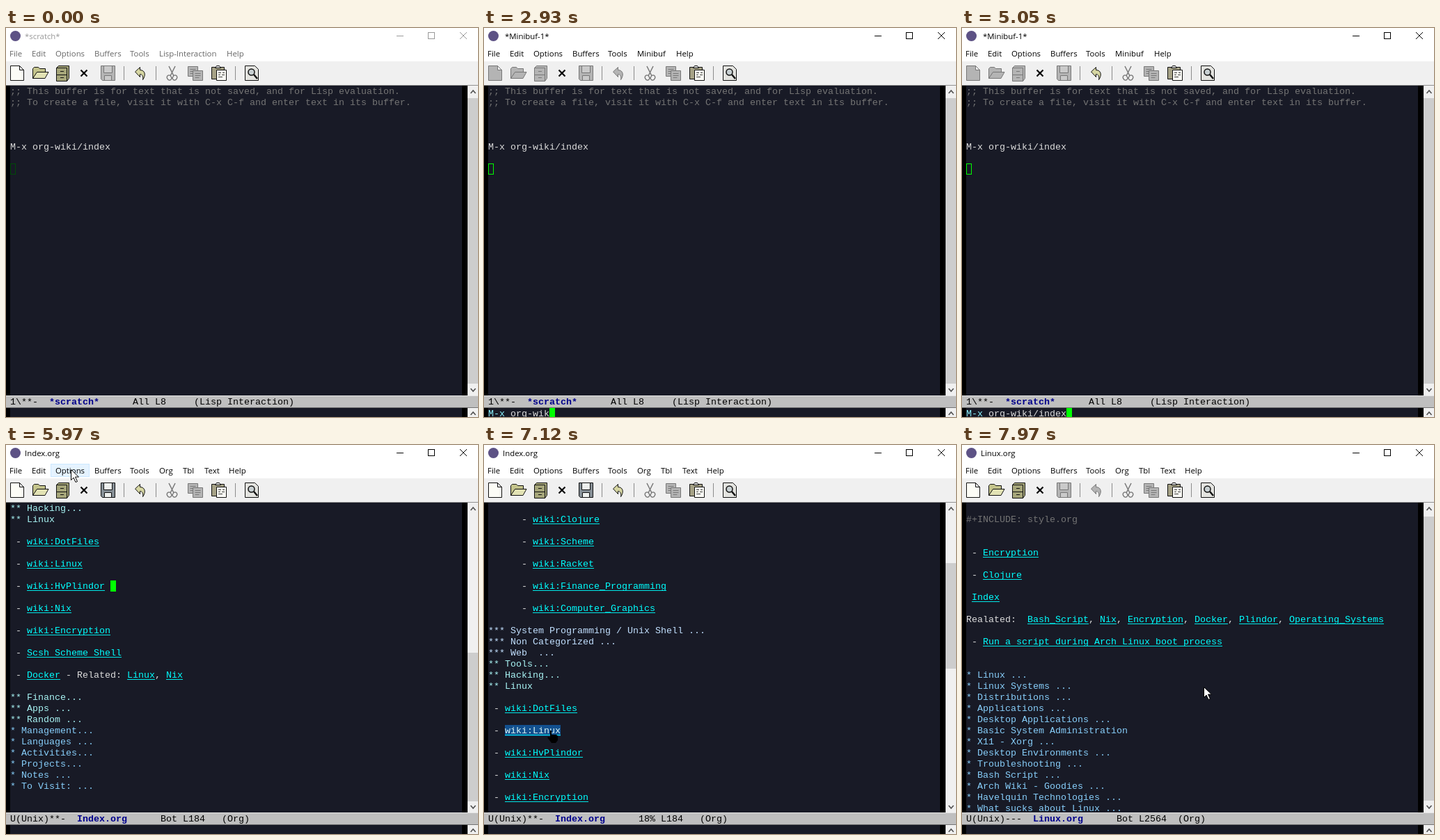
Animation of 678 by 560 pixels, one loop 8000 ms. Source, as an HTML page with a canvas:

```html
<!DOCTYPE html>
<html lang="en">
<head>
<meta charset="utf-8">
<title>Wiki index</title>
<style>
html, body { margin: 0; width: 100%; height: 100%; overflow: hidden; background: #fff; }
canvas { display: block; }
</style>
</head>
<body>
<canvas id="stage" width="678" height="560"></canvas>
<script>
const ctx = document.getElementById('stage').getContext('2d');
const LOOP = 8000, COL = 8, ROW = 16, LEFT = 6, TOP = 83, MODE_Y = 529, MODE_H = 18, ECHO_Y = 547;
const MONO = '13.333px "Liberation Mono", monospace';
const UI = '11.4px "Open Sans", sans-serif';
const BG = '#181a26', GREEN = '#00ff00';

// Links are written in [brackets].
const SCRATCH = [
  ';; This buffer is for text that is not saved, and for Lisp evaluation.',
  ';; To create a file, visit it with C-x C-f and enter text in its buffer.',
  '', '', '', 'M-x org-wiki/index'];

const COMPLETIONS = [
  'Click on a completion to select it.',
  'In this buffer, type RET to select the completion near point.',
  '', 'Possible completions are:', 'org-wiki/index', 'org-wiki/insert'];

const spaced = (indent, names) => names.flatMap(n => [indent + '- ' + n, '']);
const INDEX = [
  '',
  ...spaced('      ', ['[wiki:Clojure]', '[wiki:Scheme]', '[wiki:Racket]',
    '[wiki:Finance_Programming]', '[wiki:Computer_Graphics]']),
  '*** System Programming / Unix Shell ...', '*** Non Categorized ...', '*** Web  ...',
  '** Tools...', '** Hacking...', '** Linux', '',
  ...spaced(' ', ['[wiki:DotFiles]', '[wiki:Linux]', '[wiki:HvPlindor]', '[wiki:Nix]',
    '[wiki:Encryption]', '[Scsh Scheme Shell]', '[Docker] - Related: [Linux], [Nix]']),
  '** Finance...', '** Apps ...', '** Random ...',
  '* Management...', '* Languages ...', '* Activities...', '* Projects...', '* Notes ...',
  '* To Visit: ...'];

const LINUX = [
  '', '#+INCLUDE: style.org', '', '',
  ...spaced(' ', ['[Encryption]', '[Clojure]']), ' [Index]', '',
  'Realated:  [Bash_Script], [Nix], [Encryption], [Docker], [Plindor], [Operating_Systems]', '',
  ' - [Run a script during Arch Linux boot process]', '', '',
  '* Linux ...', '* Linux Systems ...', '* Distributions ...', '* Applications ...',
  '* Desktop Applications ...', '* Basic System Administration', '* X11 - Xorg ...',
  '* Desktop Environments ...', '* Troubleshooting ...', '* Bash Script ...',
  '* Arch Wiki - Goodies ...', '* Havelquin Technologies ...', '* What sucks about Linux ...'];

const COMMAND = 'org-wiki/index';
// [time, characters typed]
const TYPING = [[1290, 0], [1610, 2], [1910, 3], [2080, 4], [2630, 5], [2930, 7], [3010, 9],
  [4040, 10], [4190, 11], [4730, 12], [4880, 13], [5050, 14]];
// [time, x, y]
const POINTER = [[140, 150, 322], [450, 70, 216], [1610, 70, 216], [3560, 72, 214], [3800, 79, 195],
  [5810, 79, 195], [5970, 93, 35], [6040, 93, 35], [6350, 95, 300], [6660, 100, 376],
  [7120, 96, 411], [7300, 96, 411], [7970, 347, 348]];

const within = (t, a, b) => t >= a && t < b;

function rect(x, y, w, h, color) {
  ctx.fillStyle = color;
  ctx.fillRect(x, y, w, h);
}

function frame(x, y, w, h, color) {
  ctx.lineWidth = 1;
  ctx.strokeStyle = color;
  ctx.strokeRect(x + .5, y + .5, w - 1, h - 1);
}

function raised(y, h, face, light, dark) {
  rect(0, y, 678, h, face);
  rect(0, y, 678, 1, light);
  rect(0, y + h - 1, 678, 1, dark);
}

function shape(d, fill, stroke, width = 1) {
  const path = new Path2D(d);
  if (fill) { ctx.fillStyle = fill; ctx.fill(path); }
  if (stroke) { ctx.lineWidth = width; ctx.strokeStyle = stroke; ctx.stroke(path); }
}

function text(s, x, y, color, font = MONO) {
  ctx.font = font;
  ctx.fillStyle = color;
  ctx.fillText(s, x, y);
}

function pointerAt(t) {
  if (t < 140 || within(t, 1610, 3560) || within(t, 4040, 5810)) return null;
  const i = POINTER.findIndex(p => p[0] > t);
  if (i < 0) return POINTER.at(-1).slice(1);
  const [t0, x0, y0] = POINTER[i - 1], [t1, x1, y1] = POINTER[i];
  const k = (t - t0) / (t1 - t0);
  return [Math.round(x0 + (x1 - x0) * k), Math.round(y0 + (y1 - y0) * k)];
}

const hits = (p, x, y, w, h) => p && within(p[0], x, x + w) && within(p[1], y, y + h);

function lineColor(line) {
  if (/^(;;|#\+)/.test(line)) return '#747474';
  if (line.startsWith('***')) return '#c2e0ff';
  if (line.startsWith('**')) return '#a8f4f4';
  return line.startsWith('*') ? '#87cefa' : '#dcdcdc';
}

// Returns true when the pointer is over a link.
function drawLine(line, y, pointer) {
  let x = LEFT, hovered = false;
  line.split(/[\[\]]/).forEach((part, i) => {
    const w = part.length * COL, link = i % 2;
    const hot = link && hits(pointer, x, y, w, ROW);
    if (hot) { rect(x, y, w, ROW, '#12508f'); hovered = true; }
    text(part, x, y + 12, link ? (hot ? '#d8f4f4' : '#00ffff') : lineColor(line));
    if (link) rect(x, y + 14, w, 1, '#00e8e8');
    x += w;
  });
  return hovered;
}

function modeLine(y, s) {
  raised(y, MODE_H, '#bfbfbf', '#e5e5e5', '#737373');
  let x = LEFT;
  s.split('|').forEach((part, i) => {
    text(part, x, y + 13, i === 1 ? '#00008b' : '#000', i === 1 ? 'bold ' + MONO : MONO);
    x += part.length * COL;
  });
}

function scrollBar(top, bottom, thumbTop, thumbBottom) {
  rect(663, top, 15, bottom - top, '#f0f0f0');
  rect(663, thumbTop, 15, thumbBottom - thumbTop, '#cdcdcd');
  shape(`M667.5 ${top + 11}l3.5-4 3.5 4`, null, '#505050', 1.6);
  shape(`M667.5 ${bottom - 10}l3.5 4 3.5-4`, null, '#505050', 1.6);
}

function pane(top, bottom, lines, mode, thumb, pointer) {
  rect(0, top, 663, bottom - top, '#000');
  rect(LEFT, top, 649, bottom - top, BG);
  ctx.save();
  ctx.beginPath();
  ctx.rect(0, top, 678, bottom - top);
  ctx.clip();
  let hovered = false;
  lines.forEach((line, i) => {
    const y = top + i * ROW;
    if (y < bottom && drawLine(line, y, pointer)) hovered = true;
  });
  ctx.restore();
  scrollBar(top, bottom, ...thumb);
  modeLine(bottom, mode);
  return hovered;
}

function chrome(title, menu, active, pointer) {
  rect(0, 0, 678, 47, '#fff');
  ctx.fillStyle = '#5d5285';
  ctx.beginPath();
  ctx.arc(13.5, 11.5, 7.5, 0, 7);
  ctx.fill();
  const ink = active ? '#000' : '#999';
  text(title, 27, 16, ink, UI);
  rect(561, 11, 10, 1, ink);
  frame(606, 6, 10, 10, ink);
  shape('M652 6l10 10M662 6l-10 10', null, ink);
  menu.forEach(([label, x]) => {
    ctx.font = UI;
    const w = Math.round(ctx.measureText(label).width) + 14;
    if (hits(pointer, x - 7, 27, w, 19)) {
      rect(x - 7, 27, w, 19, '#e5f3ff');
      frame(x - 7, 27, w, 19, '#cce8ff');
    }
    text(label, x, 41, active ? '#000' : '#666', UI);
  });
}

function toolBar({ files, save, undo, cut }) {
  raised(47, 36, '#f0f0f0', '#fff', '#909090');
  const ink = on => on ? '#111' : '#777';
  const tint = (on, color) => on ? color : '#b4b4b4';
  shape('M6.5 54.5h13l6 6v15h-19zM19.5 54.5v6h6', tint(files, '#fcfcf6'), ink(files));
  shape('M38.5 72.5v-14l2-2h6l2 2h8v6h-12z', tint(files, '#c4c48c'), ink(files));
  shape('M38.5 72.5l6-9h16.5l-5 9z', tint(files, '#e2e2b4'), ink(files));
  shape('M72.5 57.5l3-3h15v18l-3 4h-15z', tint(files, '#a6a67a'), ink(files));
  shape('M72.5 57.5h15v19M72.5 67.5h15M78 62.5h5M78 71.5h5', null, ink(files));
  shape('M107.5 60.5l9 9M116.5 60.5l-9 9', null, '#000', 2.2);
  shape('M136.5 54.5h20v21h-18l-2-2z', tint(save, '#868f96'), ink(save));
  shape('M140.5 54.5h12v10h-12zM141.5 68.5h10v7h-10z', save ? '#eef0ee' : '#cacaca', ink(save));
  shape('M185.5 63l7-6.5v4c7 0 9 7 4 14c1-5-1-8-4-8v4z', tint(undo, '#d6d6a2'), ink(undo));
  shape('M234 55l7 14M243 55l-7 14', null, ink(cut), 1.5);
  shape('M237 70a3 3 0 1 0-5 3a3 3 0 1 0 5-3M240 70a3 3 0 1 1 5 3a3 3 0 1 1-5-3', null, ink(cut), 1.4);
  for (const [x, y] of [[261.5, 55.5], [268.5, 61.5]]) {
    shape(`M${x} ${y}h14v14h-14z`, tint(cut, '#fcfcf6'), ink(cut));
    shape(`M${x + 3} ${y + 4}h8m-8 3h8m-8 3h6`, null, ink(cut));
  }
  shape('M295.5 56.5h18v17h-18z', '#a6a286', '#111');
  shape('M300.5 57.5l2-3h4l2 3z', '#ddd', '#111');
  shape('M302.5 60.5h14v15h-14z', '#fcfcf6', '#111');
  shape('M305 64.5h4m2 0h3m-9 3h3m2 0h4m-9 3h6', null, '#333');
  shape('M343.5 54.5h14l5 5v16h-19z', '#e4e4e0', '#111');
  shape('M348 63.5a4.5 4.5 0 1 0 9 0a4.5 4.5 0 1 0-9 0', '#c8d0d2', '#111', 1.5);
  shape('M356 67l5 6', null, '#111', 2.5);
  for (const x of [169, 215, 329]) rect(x, 55, 1, 20, '#8c8c8c');
}

function drawPointer([x, y], hand) {
  ctx.save();
  ctx.translate(x, y);
  if (hand) shape('M-1 0h2v6h7l2 2v6l-3 4h-6l-6-8 2-1 2 1z', '#000');
  else shape('M.5 .5v15l3.5-3.5 3 6.5 2.5-1-3-6.5h5z', '#fff', '#000');
  ctx.restore();
}

function render(t) {
  const mini = within(t, 1290, 5430), index = within(t, 5430, 7450), linux = t >= 7450;
  const completing = within(t, 4350, 5050);
  const pointer = pointerAt(t);
  const scroll = t < 6350 ? 15 : t < 6430 ? 10 : t < 6500 ? 5 : 0;
  const menu = [['File', 5], ['Edit', 37], ['Options', 71], ['Buffers', 127], ['Tools', 178],
    ...(index || linux ? [['Org', 220], ['Tbl', 254], ['Text', 285], ['Help', 320]]
      : mini ? [['Minibuf', 220], ['Help', 276]] : [['Lisp-Interaction', 220], ['Help', 317]])];
  const title = linux ? 'Linux.org' : index ? 'Index.org' : mini ? ' *Minibuf-1*' : '*scratch*';

  chrome(title, menu, t >= 450, pointer);
  toolBar({ files: !mini, save: index, undo: !linux && !within(t, 1290, 4350), cut: within(t, 450, 680) });

  let hovered = false;
  if (linux) {
    hovered = pane(TOP, MODE_Y, LINUX, 'U(Unix)---  |Linux.org|      Bot L2564  (Org)', [103, 512], pointer);
  } else if (index) {
    const place = scroll === 15 ? 'Bot' : '18%';
    hovered = pane(TOP, MODE_Y, INDEX.slice(scroll), `U(Unix)**-  |Index.org|      ${place} L184   (Org)`,
      [Math.round(170 + scroll * 8.6), Math.round(322 + scroll * 12.7)], pointer);
    if (t < 6970) rect(LEFT + 18 * COL, TOP + (22 - scroll) * ROW, COL, ROW, GREEN);
  } else {
    const bottom = completing ? 368 : MODE_Y;
    pane(TOP, bottom, SCRATCH, '1\\**-  |*scratch*|      All L8     (Lisp Interaction)', [101, bottom - 17]);
    if (completing) {
      const top = bottom + MODE_H;
      pane(top, MODE_Y, COMPLETIONS, '1\\%*-  |*Completions*|  All L1     (Completion List)', [top + 18, 512]);
    }
    const y = TOP + 7 * ROW;
    if (within(t, 450, 1140)) rect(LEFT, y, COL, ROW, GREEN);
    else if (t < 450 || mini) frame(LEFT, y, COL, ROW, mini ? GREEN : '#004a08');
  }

  // Echo area
  rect(0, ECHO_Y, 663, 13, '#000');
  rect(LEFT, ECHO_Y, 649, 13, BG);
  rect(663, ECHO_Y, 15, 13, '#f0f0f0');
  shape('M667.5 557l3.5-4 3.5 4', null, '#505050', 1.6);
  if (mini) {
    const count = TYPING.findLast(k => k[0] <= t)[1];
    text('M-x ', LEFT, ECHO_Y + 12, '#8cf4ff');
    text(COMMAND.slice(0, count), LEFT + 4 * COL, ECHO_Y + 12, '#dcdcdc');
    const blinkedOff = within(t, 2540, 2630) || within(t, 3560, 4040);
    if (!blinkedOff) rect(LEFT + (4 + count) * COL, ECHO_Y, COL, 13, GREEN);
  }
  if (pointer) drawPointer(pointer, hovered);
}

function tick() {
  render(performance.now() % LOOP);
  requestAnimationFrame(tick);
}
tick();
</script>
</body>
</html>
```
